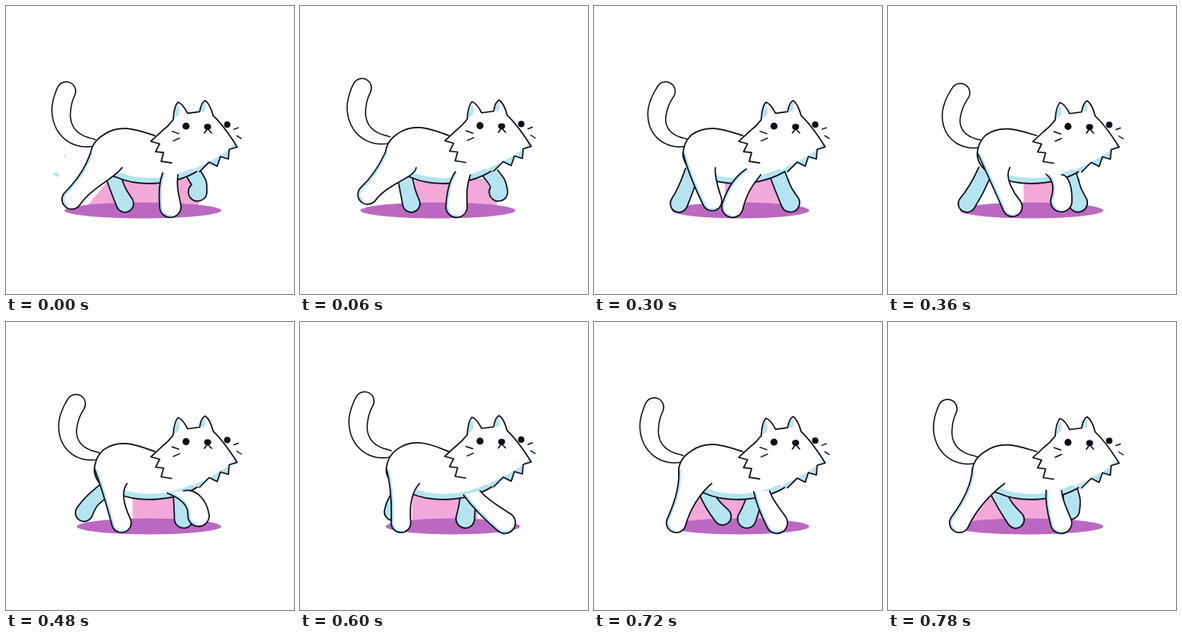
An HTML page with a canvas that plays this animation: 360x360 px, repeating every 840 ms.

```html
<!DOCTYPE html>
<html lang="en">
<head>
<meta charset="utf-8">
<title>Walking cat</title>
<style>
  html, body { margin: 0; width: 100%; height: 100%; overflow: hidden; background: #fff; }
  canvas { display: block; width: 360px; height: 360px; }
</style>
</head>
<body>
<canvas id="stage"></canvas>
<script>
const STEP = 60, STEPS = 14;
const INK = '#0d0d1a', WHITE = '#fff', BLUE = '#b5e4f1', PINK = '#f2a8d8', PURPLE = '#bb68c1';

// A paw leaves the floor at step `lift`, swings for `air` steps from x `from` to `to`,
// then is pushed back along the floor. Far legs run half a cycle later.
const HIND = { lift: 13.5, air: 5.8, swing: v => v ** 2.5 };
const FRONT = { lift: 5, air: 5, swing: v => v ** 0.4 };
const LEGS = {
  nearHind: { ...HIND, from: 82, to: 157, floor: 251, rise: 18, push: u => u ** 1.6 },
  nearFront: { ...FRONT, from: 173, to: 256, floor: 251, rise: 9, push: u => 1 - (1 - u) ** 1.6 },
  farHind: { ...HIND, from: 95, to: 170, floor: 247, rise: 10, push: u => u ** 0.8, late: 7 },
  farFront: { ...FRONT, from: 191, to: 261, floor: 246, rise: 14, push: u => u, late: 7 }
};

const canvas = document.getElementById('stage');
const ctx = canvas.getContext('2d');
const ratio = window.devicePixelRatio || 1;
canvas.width = canvas.height = 360 * ratio;
ctx.scale(ratio, ratio);
ctx.lineJoin = ctx.lineCap = 'round';

function paw(step, { lift, air, swing, from, to, floor, rise, push, late = 0 }) {
  const p = (step - late - lift + 2 * STEPS) % STEPS;
  if (p >= air) {
    const u = (p - air) / (STEPS - air);
    return { x: to - (to - from) * push(u), y: floor, bend: 0 };
  }
  const v = p / air, bend = Math.sqrt(Math.sin(Math.PI * v));
  return { x: from + (to - from) * swing(v), y: floor - rise * bend, bend };
}

function fill(path, color) {
  ctx.fillStyle = color;
  ctx.fill(path);
}

function stroke(path, width = 1.7, color = INK) {
  ctx.lineWidth = width;
  ctx.strokeStyle = color;
  ctx.stroke(path);
}

function shade(area, path, width) {
  ctx.save();
  ctx.clip(area);
  stroke(path, width, BLUE);
  ctx.restore();
}

function line(points, path = new Path2D()) {
  points.forEach(([x, y], i) => i ? path.lineTo(x, y) : path.moveTo(x, y));
  return path;
}

function dot(x, y, rx, ry = rx, color = INK) {
  const p = new Path2D();
  p.ellipse(x, y, rx, ry, 0, 0, Math.PI * 2);
  fill(p, color);
}

// Angle on the paw circle where a line from the point touches it.
function touch([x, y], foot, r, side) {
  const d = Math.hypot(x - foot.x, y - foot.y);
  return Math.atan2(y - foot.y, x - foot.x) + side * Math.acos(Math.min(1, r / d));
}

// Open outline: down the back edge, round the paw, up the front edge.
function leg(foot, r, color, hip, back, shin, knee, thigh) {
  const a1 = touch(back, foot, r, -1), a2 = touch(shin, foot, r, 1);
  const trace = end => {
    const p = new Path2D();
    p.moveTo(...hip);
    p.quadraticCurveTo(...back, foot.x + r * Math.cos(a1), foot.y + r * Math.sin(a1));
    p.arc(foot.x, foot.y, r, a1, end, true);
    return p;
  };
  const p = trace(a2);
  p.bezierCurveTo(...shin, ...knee, ...thigh);
  fill(p, color);
  if (color === WHITE) shade(p, trace(a1 - 1.6), 6);
  stroke(p);
}

function nearHind(foot, rump) {
  const lean = foot.x - 82, b = foot.bend;
  leg(foot, 12.2, WHITE,
    [rump, 183],
    [102 + 0.3 * lean - 10 * b, 210],
    [104 + 0.75 * lean + 6 * b, 236 - 18 * b],
    [126 + 0.25 * lean + 20 * b, 215],
    [145 + 0.1 * lean, 202]);
}

function nearFront(foot) {
  const lean = foot.x - 201, b = foot.bend;
  leg(foot, 13.3, WHITE,
    [195 + 0.17 * lean, 208 + 0.15 * lean],
    [187 + 0.6 * lean + 18 * b, 224 + 0.25 * lean - 10 * b],
    [212 + 0.75 * lean + 9 * b, 233 - 11 * b],
    [211 + 0.45 * lean + 9 * b, 224 - 17 * b],
    [214 + 0.2 * lean, 211]);
}

function farLeg(foot, r, hx, hy, kneeShift) {
  const kx = (hx + foot.x) / 2 + kneeShift * foot.bend, ky = 231 - 10 * foot.bend;
  const d = Math.hypot(foot.x - hx, foot.y - hy);
  const nx = (foot.y - hy) / d * r * 0.85, ny = (hx - foot.x) / d * r * 0.85;
  const front = [kx + nx, ky + ny];
  leg(foot, r, BLUE, [hx - nx, hy - ny], [kx - nx, ky - ny], front, front, [hx + nx, hy + ny]);
}

function tail(sway, bob) {
  const bx = 115 + 3.5 * sway, by = 168 + 4 * bob;
  const tx = 82.5 + 8 * sway, ty = 103.5 + 5 * bob;
  const xs = [bx, bx - 36, tx - 20 - 4 * sway, tx], ys = [by, by + 2, ty + 35, ty];
  const at = (v, t) => {
    const u = 1 - t;
    return u * u * u * v[0] + 3 * u * u * t * v[1] + 3 * u * t * t * v[2] + t * t * t * v[3];
  };
  const left = [], right = [];
  let angle = 0, w = 0;
  for (let i = 0; i <= 24; i++) {
    const t = i / 24, x = at(xs, t), y = at(ys, t);
    angle = Math.atan2(at(ys, t + 0.01) - at(ys, t - 0.01), at(xs, t + 0.01) - at(xs, t - 0.01));
    w = 3.5 + 8.3 * Math.min(1, 1.3 * t) ** 0.6;
    left.push([x + w * Math.sin(angle), y - w * Math.cos(angle)]);
    right.unshift([x - w * Math.sin(angle), y + w * Math.cos(angle)]);
  }
  const p = line(left);
  p.arc(tx, ty, w, angle - Math.PI / 2, angle + Math.PI / 2);
  right.forEach(([x, y]) => p.lineTo(x, y));
  fill(p, WHITE);
  stroke(p, 1.5);
}

// The pink light lies between the hind and front paws, the shadow under all of them.
function ground(feet) {
  const { nearHind, nearFront, farHind, farFront } = feet;
  const left = nearHind.x + 14 + 85 * nearHind.bend ** 4;
  const right = 212 + 0.6 * (farFront.x - 191);
  fill(line([[Math.max(left, 130), 216], [right, 216], [right, 249], [left, 249]]), PINK);
  const x0 = Math.min(nearHind.x, farHind.x) - 9;
  const x1 = Math.max(269, Math.max(nearFront.x, farFront.x) + 19);
  dot((x0 + x1) / 2, 255.5, (x1 - x0) / 2, 10, PURPLE);
}

function body(rump, top) {
  const p = new Path2D();
  p.moveTo(186, 162);
  p.bezierCurveTo(166, top + 3, 143, top - 7, 122, top + 8);
  p.quadraticCurveTo(rump, top + 18, rump, 187);
  p.quadraticCurveTo(rump + 3, 206, 138, 214);
  p.bezierCurveTo(165, 226, 215, 226, 247, 201);
  p.lineTo(240, 170);
  fill(p, WHITE);
  shade(p, new Path2D('M138 214C165 226 215 226 247 201'), 14);
  stroke(p);
}

function head(drop) {
  ctx.save();
  ctx.translate(0, drop);
  const p = line([[207, 195], [194, 193], [197, 182], [187, 181], [192, 171], [181, 168], [194, 156]]);
  p.quadraticCurveTo(203, 149, 209, 141);
  p.quadraticCurveTo(210, 124, 215, 119);
  p.quadraticCurveTo(221, 121, 227, 133);
  p.lineTo(242, 131);
  p.quadraticCurveTo(244, 119, 249, 117);
  p.quadraticCurveTo(255, 121, 259, 136);
  p.quadraticCurveTo(272, 148, 289, 175);
  [[279, 178], [278, 190], [268, 187], [264, 199], [254, 194], [242, 206]].forEach(q => p.lineTo(...q));
  fill(p, WHITE);
  shade(p, line([[290, 176], [277, 187], [264, 195], [240, 207]]), 12);
  fill(new Path2D('M210 140Q211 127 215 122Q218 128 216 135Z'), BLUE);
  fill(new Path2D('M243 131Q245 121 248 119Q251 125 248 131Z'), BLUE);
  stroke(p);

  dot(225, 149, 4.4);
  dot(276.5, 147, 4);
  dot(252, 149.7, 4.4, 3.7);
  stroke(new Path2D('M252 152L248 157.5M252 152L257 157.5'), 1.6);
  stroke(new Path2D('M207.5 155.5L216 158.5M209 167.5L217 164'), 1.4);
  stroke(new Path2D('M285 153L290.5 151M288.5 161L294 164.5'), 1.4);
  ctx.restore();
}

function dust() {
  fill(line([[58, 209], [61, 209], [63, 206.5], [64, 209], [67, 210], [65, 214], [61, 212]]), BLUE);
  dot(73, 188, 1.3, 1.3, BLUE);
}

function draw(step) {
  const turn = 2 * Math.PI * (step - 6) / STEPS;
  const sway = Math.cos(turn), bob = Math.cos(2 * turn);
  const rump = 108.5 + 3 * sway;
  const feet = {};
  for (const name in LEGS) feet[name] = paw(step, LEGS[name]);
  const { farHind: fh, farFront: ff } = feet;

  ctx.fillStyle = WHITE;
  ctx.fillRect(0, 0, 360, 360);
  ground(feet);
  if (step === 0) dust();
  farLeg(fh, 10.8, 126 + 0.2 * (fh.x - 121) + 9 * fh.bend, 206, -8);
  farLeg(ff, 11.6, 230 + 0.45 * (ff.x - 248) + 8 * ff.bend, 209, 5);
  tail(sway, bob);
  body(rump, 152 + 1.5 * bob);
  nearHind(feet.nearHind, rump);
  nearFront(feet.nearFront);
  head(0.7 + 0.8 * bob);
}

let shown = -1;
function tick() {
  const step = Math.floor(performance.now() / STEP) % STEPS;
  if (step !== shown) draw(shown = step);
  requestAnimationFrame(tick);
}
tick();
</script>
</body>
</html>
```
